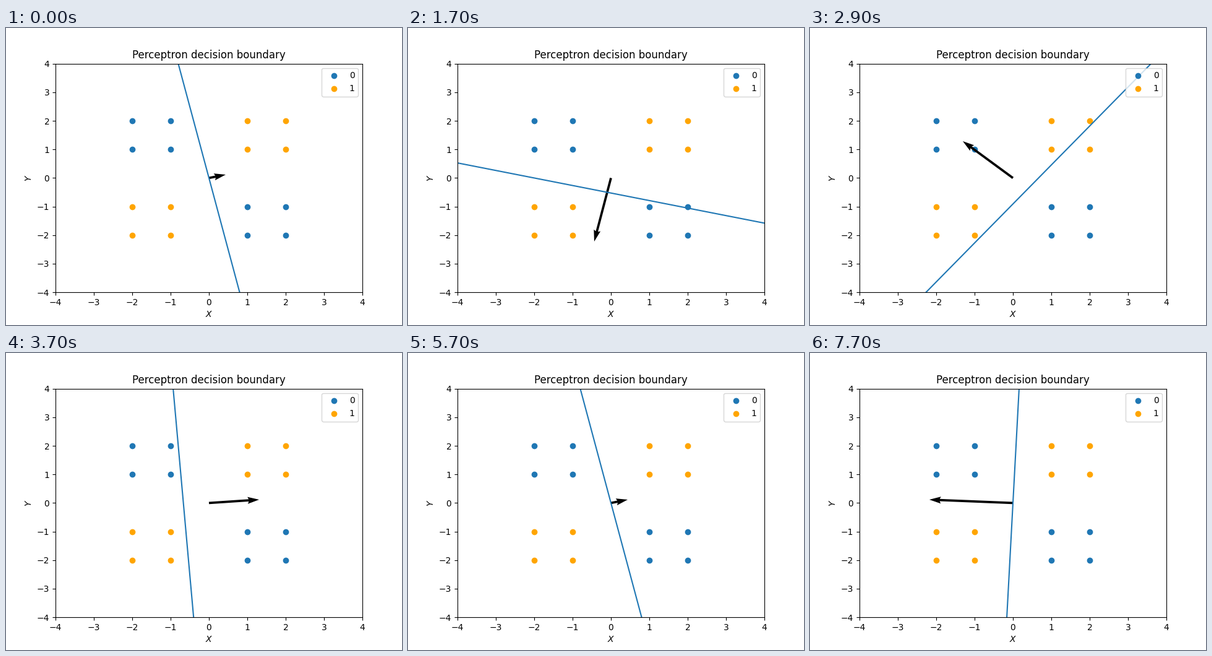
These frames come from a looping animation (640 by 480 pixels, 8000 ms). A matplotlib script:

```python
from itertools import product

import matplotlib.pyplot as plt
import numpy as np
from matplotlib.animation import FuncAnimation

FRAMES = 80
INTERVAL = 100
LIMIT = 4
START_WEIGHTS = np.array([0.5, 0.1])

# One quadrant after another, clockwise from the upper left: (xs, ys, label)
QUADRANTS = [
    ((-2, -1), (2, 1), 0),
    ((1, 2), (1, 2), 1),
    ((1, 2), (-1, -2), 0),
    ((-2, -1), (-1, -2), 1),
]
SAMPLES = [(np.array(point, float), label)
           for xs, ys, label in QUADRANTS
           for point in product(xs, ys)]


def train(steps):
    """Return the weights and bias before each perceptron step."""
    weights, bias = START_WEIGHTS.copy(), 0.0
    history = []
    for step in range(steps):
        history.append((weights.copy(), bias))
        point, label = SAMPLES[step % len(SAMPLES)]
        error = label - int(weights @ point + bias > 0)
        weights += error * point
        bias += error
    return history


history = train(FRAMES)

fig, ax = plt.subplots(figsize=(6.4, 4.8), dpi=100)
for label, color in enumerate(("C0", "orange")):
    points = np.array([p for p, target in SAMPLES if target == label])
    ax.scatter(points[:, 0], points[:, 1], color=color, label=str(label))

arrow = ax.quiver(0, 0, *START_WEIGHTS,
                  scale=18 * np.hypot(*START_WEIGHTS))
boundary, = ax.plot([], [], color="C0")
line_x = np.array([-LIMIT, LIMIT])

ax.set(xlim=(-LIMIT, LIMIT), ylim=(-LIMIT, LIMIT),
       xlabel="$X$", ylabel="$Y$", title="Perceptron decision boundary")
ax.legend(loc="upper right")


def update(frame):
    (wx, wy), bias = history[frame]
    boundary.set_data(line_x, -(wx * line_x + bias) / wy)
    arrow.set_UVC(wx, wy)
    return boundary, arrow


animation = FuncAnimation(fig, update, frames=FRAMES, interval=INTERVAL,
                          repeat=True, repeat_delay=0)
plt.show()
```
